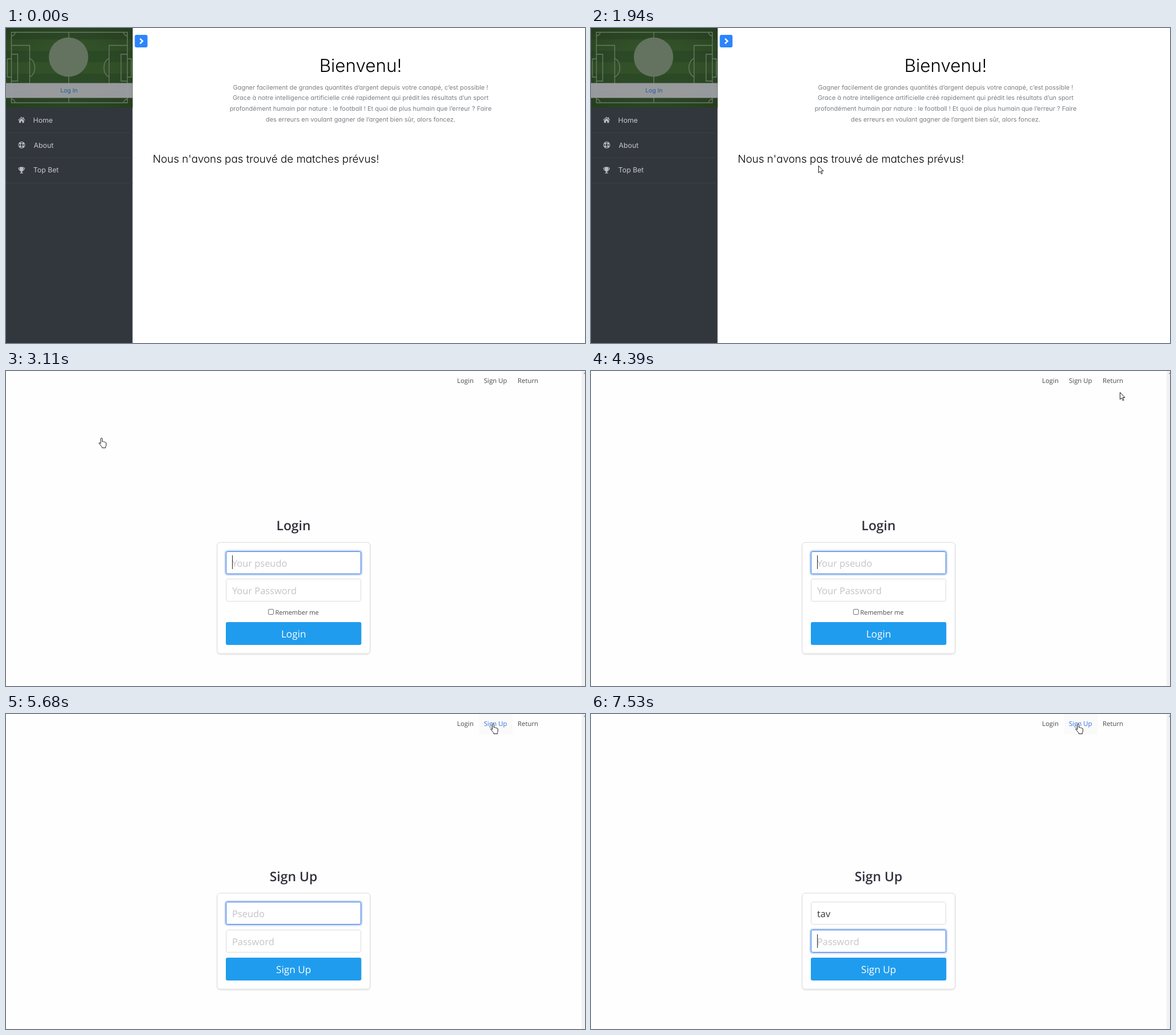
An HTML page for the animation above (8000 ms loop, 1014x552 px).

```html
<!DOCTYPE html>
<html lang="fr">
<head>
<meta charset="utf-8">
<title>Bienvenu</title>
<style>
  html, body { margin: 0; width: 100%; height: 100%; overflow: hidden; background: #fff; }
  svg { display: block; width: 1014px; height: 552px; }
  text { text-rendering: geometricPrecision; white-space: pre; }
  .mid { text-anchor: middle; }

  #home { font-family: Inter, sans-serif; font-feature-settings: "cv11"; font-optical-sizing: none; }
  #home .title { font-size: 31.4px; font-weight: 350; }
  #home .intro { font-size: 10.95px; fill: #7b7f84; }
  #home .notice { font-size: 18.75px; font-weight: 350; }
  #home .menu { font-size: 12.3px; fill: #c6c8ca; }
  #home .icon { fill: #bbbdc0; }
  .pitch { fill: none; stroke: #687b62; stroke-width: 1.4; }
  #loginText { font-size: 10.4px; }

  #account { font-family: "Open Sans", "Noto Sans", sans-serif; fill: #363636; }
  #account .nav { font-size: 11.4px; }
  #account .title { font-size: 22.9px; font-weight: 600; fill: #30323c; }
  #account .field { font-size: 16.4px; }
  #account .hint { fill: #c4c4c4; }
  #account .submit { font-size: 17.2px; fill: #fff; }
  #account .small { font-size: 11px; fill: #4a4a4a; }
  .box { fill: #fff; stroke: #dbdbdb; }
  .box.focus { stroke: #3273dc; }
  .ring { fill: none; stroke: #3273dc; stroke-opacity: .27; stroke-width: 4; }
  #cursor path { fill: #fff; stroke: #1c1c1c; stroke-linejoin: round; }
</style>
</head>
<body>
<svg viewBox="0 0 1014 552">
  <defs>
    <pattern id="grass" width="222" height="40" patternUnits="userSpaceOnUse">
      <path fill="#2c4926" d="M0 0h222v40H0z"/>
      <path fill="#325129" d="M0 20h222v20H0z"/>
    </pattern>
    <radialGradient id="vignette" r=".75">
      <stop offset=".4" stop-color="#16240f" stop-opacity="0"/>
      <stop offset="1" stop-color="#16240f" stop-opacity=".35"/>
    </radialGradient>
    <filter id="shadow" x="-5%" y="-5%" width="110%" height="115%">
      <feDropShadow dx="0" dy="1" stdDeviation="1.2" flood-color="#0a0a0a" flood-opacity=".16"/>
    </filter>
  </defs>

  <g id="home">
    <path fill="#fff" d="M0 0h1014v552H0z"/>
    <path fill="#32363d" d="M0 0h221.6v552H0z"/>
    <path fill="url(#grass)" d="M0 0h221.6v139.5H0z"/>
    <path fill="url(#vignette)" d="M0 0h221.6v139.5H0z"/>
    <g class="pitch">
      <path d="M9.5 7.500h203v123.500h-203zM110 7.500v123.500"/>
      <path id="half" d="M9.500 30.500H41.500V108H9.500M9.500 46H20.500V93H9.500M9.500 54H2.500V86H9.500M41.500 53Q50.500 58 50.500 69.500T41.500 86M9.500 14a6.500 6.500 0 0 0 6.500-6.500M9.500 124.500a6.500 6.500 0 0 1 6.500 6.500"/>
      <use href="#half" transform="translate(222) scale(-1 1)"/>
    </g>
    <circle cx="109.500" cy="51" r="34.500" fill="#64735f"/>
    <path id="loginBar" d="M0 96.500h221.600v26H0z" fill-opacity=".97"/>
    <text id="loginText" class="mid" x="110.300" y="113">Log In</text>

    <path d="M0 183.500h221.600M0 227.500h221.600M0 271.500h221.600" stroke="#3b4047"/>
    <path class="icon" d="M27.200 155.600l2.600 2.300v-1.400h1.600v2.800l2.200 2-.8.800-5.600-5-5.600 5-.8-.8zM27.200 158.200l4.300 3.900v4.100h-3.100v-3h-2.400v3h-3.100v-4.100z"/>
    <g fill="none" stroke="#bbbdc0" stroke-width="1.100">
      <circle cx="27.500" cy="205" r="5.400"/>
      <circle cx="27.500" cy="205" r="2.500"/>
      <path d="M23.800 201.300l1.900 1.900M31.200 201.300l-1.900 1.900M23.800 208.700l1.900-1.900M31.200 208.700l-1.900-1.900" stroke-width="3"/>
      <path d="M24.200 245.300h-2.200q0 3.500 3 4.300M30.200 245.300h2.200q0 3.500-3 4.300"/>
    </g>
    <path class="icon" d="M24 243.500h6.400v5q-.4 2.500-2.300 3.200v1.500q2.100.3 2.100 1.600h-6q0-1.300 2.100-1.600v-1.500q-1.900-.7-2.300-3.200z"/>
    <text class="menu" x="47.500" y="165.500">Home</text>
    <text class="menu" x="48.500" y="209.500">About</text>
    <text class="menu" x="47.800" y="253.300">Top Bet</text>

    <rect x="225.500" y="12" width="22.300" height="22" rx="3" fill="#2b85fc"/>
    <path d="M234.700 18.600l4.500 4.400-4.500 4.400" fill="none" stroke="#fff" stroke-width="2.500"/>

    <text class="title mid" x="621" y="77.300">Bienvenu!</text>
    <g class="intro mid">
      <text x="621" y="107.700">Gagner facilement de grandes quantités d’argent depuis votre canapé, c’est possible !</text>
      <text x="621" y="126.400">Grace à notre intelligence artificielle créé rapidement qui prédit les résultats d’un sport</text>
      <text x="621" y="145">profondément humain par nature : le football ! Et quoi de plus humain que l’erreur ? Faire</text>
      <text x="621" y="163.600">des erreurs en voulant gagner de l’argent bien sûr, alors foncez.</text>
    </g>
    <text class="notice" x="257" y="236">Nous n'avons pas trouvé de matches prévus!</text>
  </g>

  <g id="account">
    <path fill="#fefefe" d="M0 0h1014v552H0z"/>
    <path fill="#f1f1f1" d="M1008 0h6v552h-6z"/>
    <path fill="#8a8a8a" d="M1011.500 5l2.500-2.500V5z"/>
    <g id="nav"></g>
    <g id="forms"></g>
    <path id="caret" stroke="#222" d="M0 0v24"/>
  </g>

  <g id="cursor">
    <path id="arrow" d="M0 0V12.300L2.800 9.700 4.900 14.300 6.700 13.500 4.700 9H8.500Z"/>
    <path id="hand" d="M-1.600 1.300a1.400 1.400 0 0 1 2.800 0V6.200q2.200-.8 2.600.6q2-.5 2.400.7q1.700-.2 1.700 1.300v3.600q0 1.600-1 3v1.800h-6.200v-1.600q-2-1.600-3.400-4.200q-2.200-2-2-2.900q1-1 3.100 1.200z"/>
  </g>
</svg>

<script>
const LOOP = 8000, STEP = 70;
const LOGIN_AT = 3110, SIGNUP_AT = 5160, PASSWORD_AT = 7530;
const NAME = 'tav', TYPE_AT = 6870, KEY_GAP = 130;
const $ = id => document.getElementById(id);
const show = (id, on) => { $(id).style.display = on ? '' : 'none'; };
const clamp = (v, max) => Math.max(0, Math.min(max, v));

const links = [
  { label: 'Login', x: 790, left: 781, right: 829 },
  { label: 'Sign Up', x: 837, left: 829, right: 887 },
  { label: 'Return', x: 896, left: 887, right: 940 },
];
$('nav').innerHTML = links.map((l, i) =>
  `<rect id="linkBg${i}" x="${l.left}" y="0" width="${l.right - l.left}" height="36" fill="#fafafa"/>
   <text id="link${i}" class="nav" x="${l.x}" y="20.800">${l.label}</text>`).join('');

const field = (id, y, hint) =>
  `<rect id="${id}Ring" class="ring" x="384.500" y="${y - .5}" width="238" height="41" rx="4"/>
   <rect id="${id}Box" class="box" x="385.500" y="${y + .5}" width="236" height="39" rx="3"/>
   <text id="${id}" class="field hint" x="396" y="${y + 27.2}">${hint}</text>`;

function form(id, top, height, title, hints, extra) {
  const submitY = top + height - 55;
  return `<g id="${id}">
    <text class="title mid" x="503.500" y="${top - 21.3}">${title}</text>
    <rect x="370" y="${top}" width="267.500" height="${height}" rx="5" fill="#fff" stroke="#dedede" filter="url(#shadow)"/>
    ${hints.map((hint, i) => field(id + i, Math.round(top + 15 + 48.8 * i), hint)).join('')}
    ${extra}
    <rect x="385" y="${submitY}" width="237.300" height="40" rx="3" fill="#209cee"/>
    <text class="submit mid" x="503.700" y="${submitY + 27}">${title}</text>
  </g>`;
}
const remember =
  `<rect x="459.500" y="417.500" width="9" height="9" rx="1.500" fill="#fff" stroke="#767676"/>
   <text class="small" x="471.500" y="426.500">Remember me</text>`;
$('forms').innerHTML =
  form('login', 300.5, 194.5, 'Login', ['Your pseudo', 'Your Password'], remember) +
  form('signup', 314, 168, 'Sign Up', ['Pseudo', 'Password'], '');

const linear = p => p, easeOut = p => p * (2 - p), easeBoth = p => p * p * (3 - 2 * p);
// time, x, y, easing on the way to this point
const route = [
  [1170, 889, 538, linear], [1940, 398, 241, easeOut],
  [2570, 167, 117, easeBoth], [3760, 167, 117, linear],
  [4320, 933, 50, easeBoth], [4390, 926, 37, linear],
  [4460, 908, 24, linear], [4600, 872, 13, linear],
  [4740, 860, 9, linear], [5090, 853, 17, easeBoth],
];

// the pointer advances in steps, as a screen recorder catches it
function pointer(t) {
  const anchor = t < LOGIN_AT ? 1170 : 3760;
  const time = anchor + Math.floor((t - anchor) / STEP) * STEP;
  const next = route.findIndex(k => k[0] > time);
  if (next <= 0) return route.at(next).slice(1, 3);
  const [t0, x0, y0] = route[next - 1], [t1, x1, y1, ease] = route[next];
  const p = ease((time - t0) / (t1 - t0));
  return [x0 + (x1 - x0) * p, y0 + (y1 - y0) * p];
}

function setFocus(id, on) {
  show(id + 'Ring', on);
  $(id + 'Box').classList.toggle('focus', on);
}

const blink = (t, since) => Math.floor((t - since) / 530) % 2 === 0;

function drawCaret(t, typed) {
  let x = 396.5, y = 323, on = blink(t, 3040);
  if (t >= PASSWORD_AT) {
    y = 386;
    on = true;
  } else if (t >= SIGNUP_AT) {
    y = 337;
    on = typed > 0 || blink(t, 5150);
    if (typed) x += Math.round($('signup0').getComputedTextLength());
  }
  show('caret', on);
  $('caret').setAttribute('transform', `translate(${x} ${y})`);
}

// each page returns whether the hand cursor is shown
function drawAccount(t, x, y) {
  const signup = t >= SIGNUP_AT, onPassword = t >= PASSWORD_AT;
  show('login', !signup);
  show('signup', signup);

  // a fresh page ignores the pointer for a moment
  const settled = !signup || t >= 5420;
  let hovering = false;
  links.forEach((l, i) => {
    const over = settled && y < 36 && x >= l.left && x < l.right;
    show('linkBg' + i, over);
    $('link' + i).setAttribute('fill', over ? '#3273dc' : '#4a4a4a');
    hovering = hovering || over;
  });

  const typed = clamp(Math.floor((t - TYPE_AT) / KEY_GAP) + 1, NAME.length);
  $('signup0').textContent = typed ? NAME.slice(0, typed) : 'Pseudo';
  $('signup0').classList.toggle('hint', !typed);
  setFocus('login0', true);
  setFocus('login1', false);
  setFocus('signup0', !onPassword);
  setFocus('signup1', onPassword);
  drawCaret(t, typed);
  return hovering || t < 3830;
}

function drawHome(t, x, y) {
  const over = t > 2000 && x < 222 && y > 96 && y < 122;
  const fade = clamp(Math.floor((t - 2770) / STEP) + 1, 3) / 3;
  const mix = (a, b) => a + (b - a) * fade;
  $('loginBar').setAttribute('fill', `rgb(${mix(155, 143)},${mix(157, 146)},${mix(161, 152)})`);
  $('loginText').setAttribute('fill', over ? '#3d4c6e' : '#255a9f');
  return over;
}

function draw(t) {
  const account = t >= LOGIN_AT;
  const [x, y] = pointer(t);
  show('home', !account);
  show('account', account);
  const hand = (account ? drawAccount : drawHome)(t, x, y);
  show('cursor', t >= 1180);
  show('arrow', !hand);
  show('hand', hand);
  $('cursor').setAttribute('transform', `translate(${Math.round(x) + .5} ${Math.round(y) + .5})`);
}

const start = performance.now();
function tick() {
  draw((performance.now() - start) % LOOP);
  requestAnimationFrame(tick);
}
tick();
</script>
</body>
</html>
```
